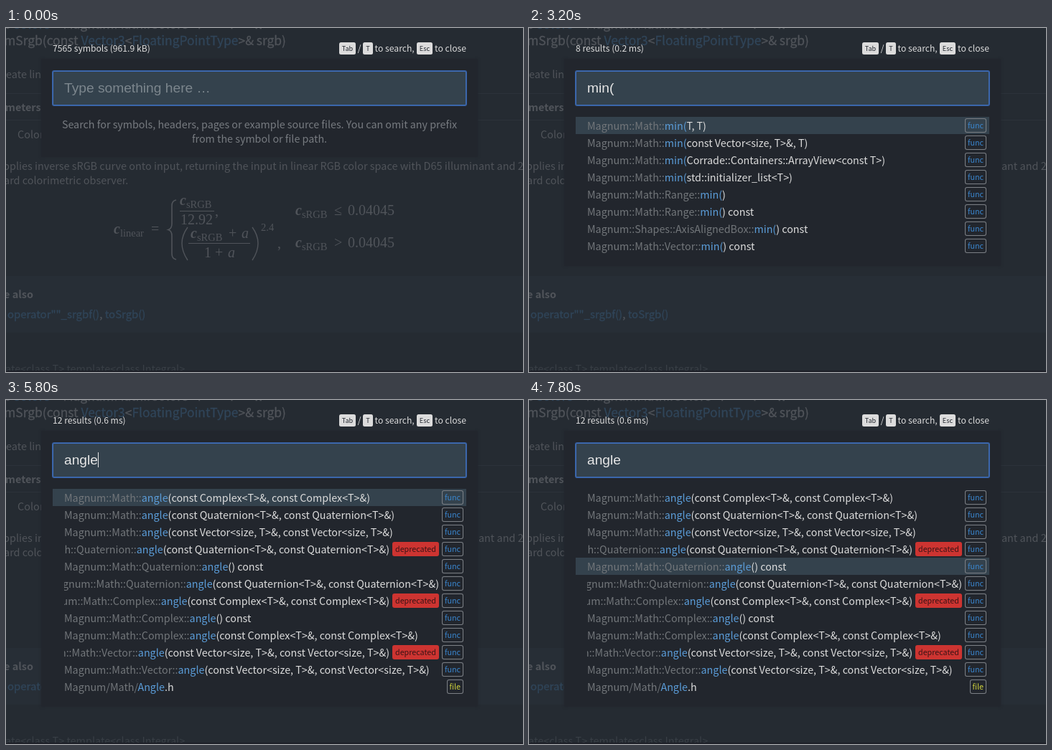
Recreate the animation shown at these times as an HTML page. Size 720x480 px, loop 8000 ms.

```html
<!DOCTYPE html>
<html lang="en">
<head>
<meta charset="utf-8">
<title>Symbol search</title>
<style>
html, body { margin: 0; width: 100%; height: 100%; overflow: hidden; background: #252b32; }
body, svg { font: 14.3px "Noto Sans CJK SC", "Noto Sans CJK JP", "Noto Sans CJK", "Open Sans", sans-serif; }
#stage { position: relative; width: 720px; height: 480px; overflow: hidden; }
#stage > * { position: absolute; }
svg { left: 0; top: 0; fill: #50545a; white-space: pre; font-size: 14.45px; }
svg .link { fill: #304559; }
svg .semi { stroke: #50545a; stroke-width: .3px; }
svg .semi .link { stroke: #304559; }
svg .math { font-family: "Liberation Serif", serif; font-size: 20px; }
svg .math .c { font-weight: bold; font-style: italic; }
svg .math .small { font-size: 14.5px; }
svg .line { fill: none; stroke: #50545a; }
svg .head { fill: #dcdcdc; font-size: 12.17px; }
svg .key { fill: #22272e; font-size: 9.2px; text-anchor: middle; }
#popup { left: 49px; top: 43px; width: 608px; background: #22262d; box-shadow: 0 0 3px #22262d; }
#input { left: 65px; top: 60px; width: 559px; height: 46px; padding-left: 15px; border: 1px solid #3f6db8;
  border-radius: 2px; box-shadow: 0 0 0 1px #365f9f; background: #34424d; color: #e6e6e6; white-space: pre;
  font: 19.2px/46px "Liberation Sans", Arial, sans-serif; }
#input i { display: inline-block; width: 1px; height: 21px; margin-right: -1px; background: #e6e6e6; vertical-align: -4px; }
#input .hint { color: #7c868d; }
#input .all { background: #0a62d8; color: #fff; }
#results { left: 65px; top: 124px; width: 576px; color: #dcdcdc; }
#results.scroll { width: 561px; }
#results p { margin: 0; line-height: 20px; text-align: center; color: #777b80; }
.row { display: flex; align-items: center; height: 24px; padding: 0 4px 0 16px; line-height: 24px; white-space: pre; }
.row.on { background: #34424d; }
.name { flex: 1; min-width: 0; overflow: hidden; direction: rtl; text-align: left; }
.name s { color: #72767a; text-decoration: none; }
.name b { color: #5b9dd9; font-weight: normal; }
.tag { margin-left: 4px; padding: 0 4px; height: 20px; border-radius: 3px; font-size: 10.74px; line-height: 19px;
  box-shadow: inset 0 0 0 1px #7c8086; }
.func { color: #3a86cf; }
.file { color: #d0d33c; }
.deprecated { background: #cd3431; color: #3a1416; box-shadow: none; }
#bar { left: 626px; top: 124px; width: 15px; height: 360px; background: #f1f1f1; }
#bar::before { content: ""; position: absolute; left: 4px; top: 5px; border: 3.5px solid transparent; border-top: 0; border-bottom: 4px solid #505050; }
#thumb { position: absolute; left: 2px; top: 15px; width: 11px; background: #c1c1c1; }
</style>
</head>
<body>
<div id="stage">
  <svg id="page" width="720" height="480"></svg>
  <div id="popup"></div>
  <div id="input"></div>
  <div id="results"></div>
  <div id="bar"><div id="thumb"></div></div>
</div>
<script>
const $ = id => document.getElementById(id);
const escape = s => s.replace(/&/g, '&amp;').replace(/</g, '&lt;');

// Dimmed documentation page and the header line
const text = (x, y, s, attrs = '') => `<text x="${x}" y="${y}" ${attrs}>${s}</text>`;
const link = s => `<tspan class="link">${escape(s)}</tspan>`;
const math = (x, y, s) => text(x, y, s, 'class="math"');
const symbol = (x, y, sub) => math(x, y, `<tspan class="c">c</tspan><tspan class="small" dy="4">${sub}</tspan>`);
const a = '<tspan font-style="italic">a</tspan>';
const path = (d, width = 1) => `<path class="line" stroke-width="${width}" d="${d}"/>`;
const key = (x, w, s) => `<rect x="${x}" y="20" width="${w}" height="17" rx="2.5" fill="#dcdcdc"/>` +
  text(x + w / 2, 32, s, 'class="key"');
const head = (x, s, attrs = '') => text(x, 33, s, 'class="head" ' + attrs);

$('page').innerHTML = [
  '<rect y="346" width="720" height="79" fill="#272e36"/>',
  '<path d="M0 91.5H720M0 128.5H720" stroke="#2c323a"/>',
  text(-2, 1, `t ${link('Color3')} = MagnumMath::Color3&lt;T&gt; · T · w`, 'class="semi" font-size="17.4"'),
  text(390, 24, `mSrgb(const ${link('Vector3')}&lt;${link('FloatingPointType')}&gt;&amp; srgb)`,
    'class="semi" font-size="17.4" text-anchor="end"'),
  text(0, 70, 'eate linear'),
  text(-1, 116, 'meters', 'font-weight="bold"'),
  text(16, 154, 'Color'),
  text(-4, 198, 'pplies inverse sRGB curve onto input, returning the input in linear RGB color space with D65 illuminant and 2°'),
  text(-3, 218, 'ard colorimetric observer.'),
  symbol(150, 287, 'linear'), math(202, 287, '='),
  path('M237 240q-6 1-6 8v25q0 7-5 8.5q5 1.5 5 8.5v25q0 7 6 8', 1.6),
  symbol(242, 247, 'sRGB'), path('M242 255.5H290'), math(243, 274, '12.92'), math(291, 262, ','),
  path('M253 278q-16 22 0 46M343 278q16 22 0 46', 1.4),
  symbol(257, 293, 'sRGB'), math(310, 293, '+'), math(328, 293, a), path('M254 300.5H340'),
  math(276, 320, '1'), math(291, 320, '+'), math(309, 320, a),
  math(355, 283, '<tspan class="small">2.4</tspan>'), math(378, 307, ','),
  symbol(403, 261, 'sRGB'), math(457, 261, '≤'), math(476, 261, '0.04045'),
  symbol(403, 306, 'sRGB'), math(457, 306, '&gt;'), math(476, 306, '0.04045'),
  text(-3, 377, 'e also', 'font-weight="bold"'),
  text(2, 405, `${link('operator""_srgbf()')}, ${link('toSrgb()')}`, 'class="semi" font-size="14.95"'),
  text(-1, 481, 'ate&lt;class T&gt; template&lt;class Integral&gt;', 'fill="#393f46"'),
  '<rect y="478" width="720" height="2" fill="#1e2028"/>',
  head(65, '', 'id="status"'),
  key(464, 23, 'Tab'), head(489.7, '/'), key(497, 14, 'T'), head(513.6, 'to search,'),
  key(572, 22, 'Esc'), head(641, 'to close', 'text-anchor="end"')
].join('');

// Each entry: scope | symbol | tags (func when left out)
const complex = 'angle(const Complex<T>&, const Complex<T>&)';
const quaternion = 'angle(const Quaternion<T>&, const Quaternion<T>&)';
const vector = 'angle(const Vector<size, T>&, const Vector<size, T>&)';
const symbols = [
  'Magnum::Math::|min(T, T)',
  'Magnum::Math::|min(const Vector<size, T>&, T)',
  'Magnum::Math::|min(Corrade::Containers::ArrayView<const T>)',
  'Magnum::Math::|min(std::initializer_list<T>)',
  'Magnum::Renderer::BlendEquation::|Min|enum val',
  'Magnum::Math::Range::|min()',
  'Magnum::Math::Range::|min() const',
  'Magnum::Shapes::AxisAlignedBox::|min() const',
  'Magnum::Math::Vector::|min() const',
  ...['Glfw', 'Glut', 'AbstractX', 'Sdl2'].map(s => `Magnum::Platform::${s}Application::KeyEvent::Key::|Minus|enum val`),
  'Magnum::Math::|minmax(const T&, const T&)',
  'Magnum::Math::|minmax(Corrade::Containers::ArrayView<const T>)',
  'Magnum::Math::BoolVector::|any() const',
  'Magnum::Renderer::LogicOperation::|And|enum val',
  'Magnum::Shapes::CompositionOperation::|And|enum val',
  ...[complex, quaternion, vector].map(s => 'Magnum::Math::|' + s),
  `Magnum::Math::Quaternion::|${quaternion}|deprecated,func`,
  'Magnum::Math::Quaternion::|angle() const',
  'Magnum::Math::Quaternion::|' + quaternion,
  `Magnum::Math::Complex::|${complex}|deprecated,func`,
  'Magnum::Math::Complex::|angle() const',
  'Magnum::Math::Complex::|' + complex,
  `Magnum::Math::Vector::|${vector}|deprecated,func`,
  'Magnum::Math::Vector::|' + vector,
  'Magnum::Ui::Anchor::|Anchor(Snaps, const Range2D&)',
  'Magnum/Math/|Angle.h|file'
].map(s => s.split('|'));

// Time, typed text, number of results, search time
const typing = [
  [0, ''], [1800, 'm', 100, 2.1], [2000, 'mi', 31, 1.1], [2200, 'min', 29, 0.9], [2600, 'min(', 8, 0.2],
  [5000, 'an', 75, 1.2], [5200, 'ang', 12, 0.7], [5400, 'angl', 12, 0.6], [5600, 'angle', 12, 0.6]
];
const arrowDown = [6000, 6200, 6400, 6600];

function row([scope, name, tags = 'func'], i, query, selected) {
  const n = query.length;
  return `<div class="row${i === selected ? ' on' : ''}"><div class="name"><bdi dir="ltr"><s>${scope}</s>` +
    `<b>${escape(name.slice(0, n))}</b>${escape(name.slice(n))}</bdi></div>` +
    tags.split(',').map(t => `<span class="tag ${t}">${t}</span>`).join('') + '</div>';
}

function showResults([, query, count, ms], selected) {
  const scroll = count > 31;
  $('status').textContent = query
    ? `${count}${count === 100 ? '+' : ''} results (${ms} ms)` : '7565 symbols (961.9 kB)';
  $('popup').style.height = (query ? count * 24 + 97 : 137) + 'px';
  $('results').className = scroll ? 'scroll' : '';
  $('results').innerHTML = query
    ? symbols.filter(s => s[1].toLowerCase().startsWith(query)).slice(0, 15)
      .map((s, i) => row(s, i, query, selected)).join('')
    : '<p>Search for symbols, headers, pages or example source files. You can omit any prefix<br>from the symbol or file path.</p>';
  $('bar').hidden = !scroll;
  $('thumb').style.height = 22650 / count + 'px';
}

function showInput(query, caret, all) {
  const bar = caret ? '<i></i>' : '';
  $('input').innerHTML = !query ? bar + '<span class="hint">Type something here …</span>'
    : all ? `<span class="all">${query}</span>` : query + bar;
}

let lastResults, lastInput;
function draw() {
  const t = performance.now() % 8000;
  const state = typing.filter(k => k[0] <= t).pop();
  const [since, query] = state;
  const selected = arrowDown.filter(k => k <= t).length;
  const all = t >= 4000 && t < 5000;
  const caret = (since > 0 && t - since < 400) || (t + 200) % 800 >= 400;
  const results = query + selected, input = query + caret + all;
  if (results !== lastResults) showResults(state, selected);
  if (input !== lastInput) showInput(query, caret, all);
  lastResults = results;
  lastInput = input;
  requestAnimationFrame(draw);
}
draw();
</script>
</body>
</html>
```
